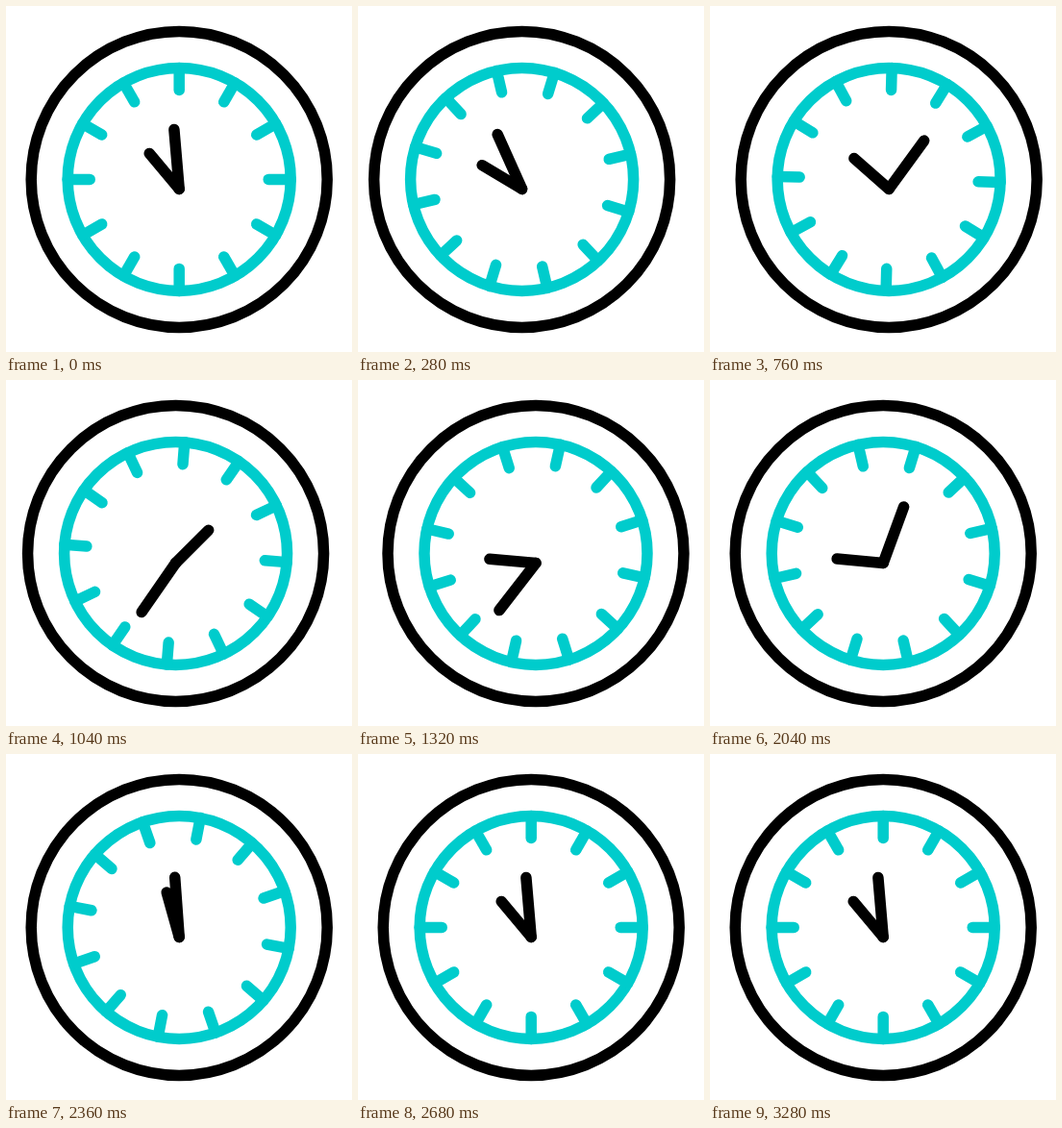
An HTML page for the animation above (3.64 s loop, 360x360 px).

```html
<!DOCTYPE html>
<html lang="en">
<head>
<meta charset="utf-8">
<title>Clock</title>
<style>
  html, body { margin: 0; width: 100%; height: 100%; overflow: hidden; background: #fff; }
  svg { display: block; width: 100%; height: 100%; }
  svg * { fill: none; stroke-width: 11.5; stroke-linecap: round; }
  .ink { stroke: #000; }
  .accent { stroke: #00cccc; }
</style>
</head>
<body>
<svg viewBox="0 0 360 360">
  <g id="clock">
    <circle class="ink" cx="180" cy="180" r="154"/>
    <circle class="accent" cx="180" cy="180" r="116"/>
    <g id="ticks"></g>
    <path id="hour" class="ink" d="M180 190L149 153"/>
    <path id="minute" class="ink" d="M180 190L174.7 128"/>
  </g>
</svg>
<script>
const LOOP = 3640, STEP = 40;
const REST_X = 0.2, REST_Y = 0.4;
const byId = id => document.getElementById(id);
const clock = byId('clock'), ticks = byId('ticks'), hour = byId('hour'), minute = byId('minute');

for (let i = 0; i < 12; i++) {
  const tick = document.createElementNS('http://www.w3.org/2000/svg', 'path');
  tick.setAttribute('class', 'accent');
  tick.setAttribute('d', 'M180 64V87');
  tick.setAttribute('transform', `rotate(${i * 30} 180 180)`);
  ticks.append(tick);
}

// Cubic easing with flat ends; a and b are the handle positions in time.
const ease = (a, b) => x => {
  let lo = 0, hi = 1;
  for (let i = 0; i < 24; i++) {
    const s = (lo + hi) / 2, r = 1 - s;
    if (3 * a * s * r * r + 3 * b * s * s * r + s ** 3 < x) lo = s; else hi = s;
  }
  return lo * lo * (3 - 2 * lo);
};
const soft = x => (1 - Math.cos(Math.PI * x)) / 2;
const spin = ease(0.61, 0.51), lateSpin = ease(0.52, 0.484);

// Each key is [time, value, easing used to reach it].
function valueAt(keys, t) {
  const next = keys.findIndex(key => key[0] > t);
  if (next === 0) return keys[0][1];
  if (next < 0) return keys[keys.length - 1][1];
  const [t0, v0] = keys[next - 1], [t1, v1, easing = soft] = keys[next];
  return v0 + (v1 - v0) * easing((t - t0) / (t1 - t0));
}

const shakeKeys = [[50, 0], [350, -11], [650, 11], [950, -6], [1250, 5.5], [1550, 0]];
const tickKeys = [[100, 0], [400, -20], [2040, 377, spin], [2140, 377], [2680, 360]];
const minuteKeys = [[0, 0], [320, -20], [400, -20], [2040, 1105, spin], [2400, 1080]];
const hourKeys = [[0, 0], [320, -20], [605, -20], [2400, 1105, lateSpin], [2680, 1080]];

function turn(node, angle, cy) {
  node.setAttribute('transform', `rotate(${angle.toFixed(2)} 180 ${cy})`);
}

function render(time) {
  const t = Math.floor((time % LOOP) / STEP) * STEP;
  const x = REST_X + valueAt(shakeKeys, t);
  clock.setAttribute('transform', `translate(${x.toFixed(2)} ${REST_Y})`);
  turn(ticks, valueAt(tickKeys, t), 180);
  turn(minute, valueAt(minuteKeys, t), 190);
  turn(hour, valueAt(hourKeys, t), 190);
}

const start = performance.now();
function frame() {
  render(performance.now() - start);
  requestAnimationFrame(frame);
}
frame();
</script>
</body>
</html>
```
